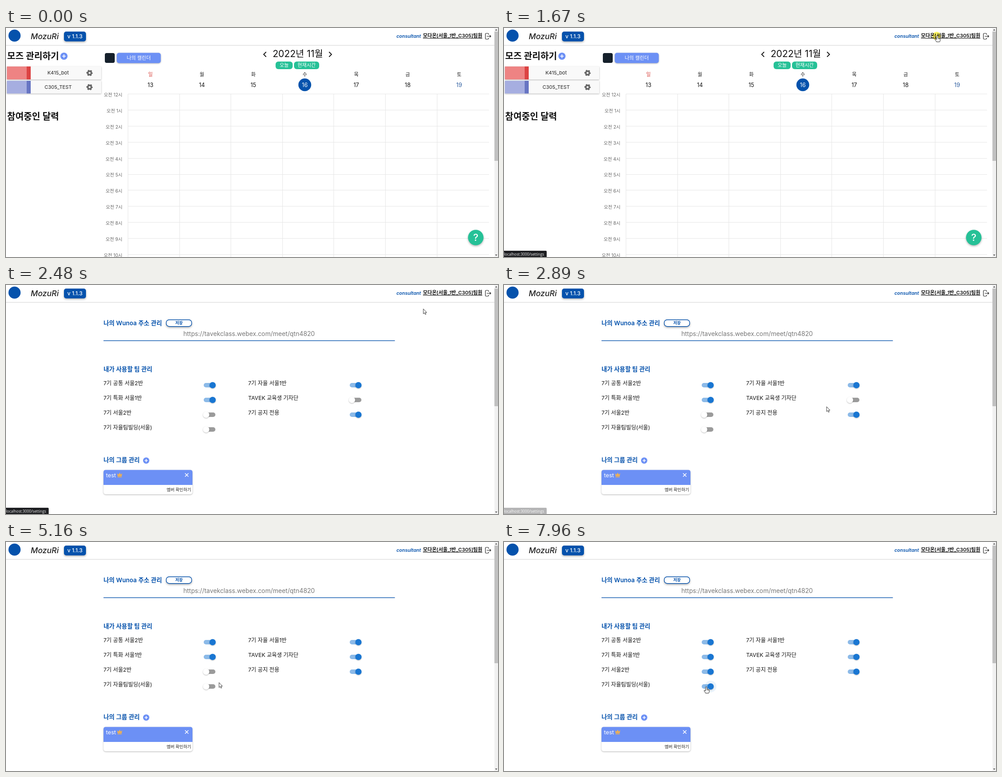
Animation of 1095x512 px, one loop 8 s. Source, as an HTML page:

```html
<!DOCTYPE html>
<html lang="ko">
<head>
<meta charset="utf-8">
<title>Calendar settings</title>
<style>
  html, body { margin: 0; width: 100%; height: 100%; overflow: hidden; background: #fff; }
  svg { display: block; width: 100vw; height: 100vh; }
  text { font-family: Inter, "Noto Sans CJK KR", "Noto Sans CJK", sans-serif; white-space: pre; }
  .lift { filter: drop-shadow(0 1px 1.5px rgba(0, 0, 0, .3)); }
  .float { filter: drop-shadow(0 2px 2px rgba(0, 0, 0, .3)); }
  .knob { filter: drop-shadow(0 1px .8px rgba(0, 0, 0, .28)); }
  .mark { mix-blend-mode: multiply; }
</style>
</head>
<body>
<svg id="stage" viewBox="0 0 1095 512"></svg>
<script>
const LOOP = 8000, TICK = 67;
const BLUE = '#0552ac', SOFT = '#6c90f5', GREEN = '#26c197', INK = '#111';

// --- drawing helpers (text is placed by its vertical centre) ---
const text = (x, cy, str, size, fill = INK, weight = 400, anchor = 'start', more = '') =>
  `<text x="${x}" y="${cy + size * .36}" font-size="${size}" fill="${fill}" font-weight="${weight}" text-anchor="${anchor}" ${more}>${str}</text>`;
const mid = (x, cy, str, size, fill, weight, more) => text(x, cy, str, size, fill, weight, 'middle', more);
const rect = (x, y, w, h, fill, rx = 0, more = '') =>
  `<rect x="${x}" y="${y}" width="${w}" height="${h}" fill="${fill}" rx="${rx}" ${more}/>`;
const circle = (x, y, r, fill, more = '') => `<circle cx="${x}" cy="${y}" r="${r}" fill="${fill}" ${more}/>`;
const line = (d, color, width = 1, more = '') =>
  `<path d="${d}" fill="none" stroke="${color}" stroke-width="${width}" ${more}/>`;
const group = (id, body, more = '') => `<g id="${id}" ${more}>${body}</g>`;
const range = n => [...Array(n).keys()];
const LIFT = 'class="lift"', FLOAT = 'class="float"';

const plus = (x, y, r) => circle(x, y, r, SOFT) +
  line(`M${x - r * .5} ${y}h${r}M${x} ${y - r * .5}v${r}`, '#fff', 1.7);
const gear = (x, y) => circle(x, y, 4, 'none', 'stroke="#666" stroke-width="3.4"') +
  circle(x, y, 6.1, 'none', 'stroke="#666" stroke-width="2" stroke-dasharray="3.4 2.99" stroke-dashoffset="1.7"');

// --- parts of the page ---
function header() {
  return rect(0, 0, 1087, 39, '#fff') + rect(0, 38, 1087, 1, '#dedede') + rect(0, 39, 1087, 1, '#f1f1f1') +
    circle(19, 17, 13.5, BLUE) +
    text(55, 19, 'MozuRi', 17.5, '#222', 500, 'start', 'font-style="italic"') +
    rect(129, 8, 49, 22, BLUE, 5, FLOAT) + mid(153.5, 18.5, 'v 1.1.3', 12.2, '#fff', 500) +
    text(869, 18, 'consultant', 10.5, BLUE, 600, 'start', 'font-style="italic"') +
    text(928, 17.5, '모다온[서울_1반_C305]팀원', 11, INK, 600, 'start', 'text-decoration="underline"') +
    line('M1074 15V13.5Q1074 12 1072.5 12H1068.5Q1067 12 1067 13.5V23.5Q1067 25 1068.5 25H1072.5Q1074 25 1074 23.5V22M1070 18.5H1079M1076.5 16L1079 18.5L1076.5 21', '#222', 1.2);
}

function scrollbar() {
  return rect(1087, 0, 8, 512, '#f1f1f1') + rect(1087, 8, 8, 289, '#c1c1c1', 0, 'id="thumb"') +
    '<path d="M1088.5 5.5l2.5-3l2.5 3zM1088.5 506.5l2.5 3l2.5-3z" fill="#505050"/>';
}

function teamCard(y, h, name, pale, strong) {
  const cy = y + h / 2;
  return rect(2, y, 210, h, '#f9f9f9', 1, LIFT) + rect(2, y, 44, h, pale) + rect(46, y, 9, h, strong) +
    mid(116, cy, name, 11, '#222') + gear(186, cy);
}

function calendar() {
  const colX = i => 271.5 + 114.6 * i, rowY = i => 147.5 + 35.9 * i;
  const days = [...'일월화수목금토'].map((day, i) => {
    const x = 321.5 + 114.5 * i, today = i === 3;
    const tint = today ? '#fff' : i === 6 ? '#2a5b9e' : INK;
    return mid(x, 104, day, 11, i ? '#222' : '#d8453f') +
      (today ? circle(x, 127, 14.3, BLUE) : '') + mid(x, 127, 13 + i, 12.5, tint);
  }).join('');
  const hours = range(11).map(i => text(259, 149.3 + 35.9 * i, `오전 ${i || 12}시`, 10.2, '#666', 400, 'end')).join('');
  const grid = range(7).map(i => `M${Math.floor(colX(i)) + .5} 147V512`).join('') +
    range(11).map(i => `M271 ${Math.floor(rowY(i)) + .5}H1075`).join('');
  return text(2.5, 63, '모즈 관리하기', 20, INK, 600) + plus(129, 63, 8) +
    teamCard(86, 29, 'K415_bot', '#ee8383', '#dc4343') +
    teamCard(118, 28.5, 'C305_TEST', '#a6aee0', '#6775c3') +
    text(2.5, 198, '참여중인 달력', 20, INK, 600) +
    rect(220, 56, 22, 22, '#15202b', 4) +
    rect(246.5, 55.5, 98, 23, SOFT, 5, LIFT) + mid(295.5, 67, '나의 캘린더', 11, '#fff', 500) +
    line('M579 53.5l-5.5 5.5l5.5 5.5M719 53.5l5.5 5.5l-5.5 5.5', INK, 1.8) +
    mid(649.5, 58, '2022년 11월', 20.8) +
    rect(600, 75, 38, 17, GREEN, 6) + mid(619, 83.5, '오늘', 11, '#fff', 500) +
    rect(641, 75, 56, 17, GREEN, 6) + mid(669, 83.5, '현재시간', 11, '#fff', 500) +
    line(grid, '#e6e6e6') + days + hours +
    circle(1045.5, 468.5, 17.3, GREEN, FLOAT) + mid(1045.5, 468.5, '?', 22, '#fff', 500);
}

function groupBox(y, headH, h) {
  const crossY = y + headH / 2 - 9.2;
  return text(217, y - 22, '나의 그룹 관리', 13.4, BLUE, 600) + plus(312, y - 21, 7) +
    rect(217, y, 198, h, '#fff', 5, LIFT) +
    `<path d="M217 ${y + headH}V${y + 5}q0-5 5-5h188q5 0 5 5V${y + headH}z" fill="${SOFT}"/>` +
    line(`M398.5 ${crossY}l7.5 7.5m0-7.5l-7.5 7.5`, '#fff', 1.6) +
    text(412, y + h - 10.7, '멤버 확인하기', 9.4, '#222', 400, 'end');
}

// label, column, row, then either a fixed state or the click tick and hover span
const teams = [
  { label: '7기 공통 서울2반', col: 0, row: 0, on: true },
  { label: '7기 자율 서울1반', col: 1, row: 0, on: true },
  { label: '7기 특화 서울1반', col: 0, row: 1, on: true },
  { label: 'TAVEK 교육생 기자단', col: 1, row: 1, click: 63, hover: [48, 69] },
  { label: '7기 서울2반', col: 0, row: 2, click: 89, hover: [81, 95] },
  { label: '7기 공지 전용', col: 1, row: 2, on: true },
  { label: '7기 자율팀빌딩(서울)', col: 0, row: 3, click: 113, hover: [94, 120] },
];

function teamRow({ label, col, row }, i) {
  const left = col ? 765 : 440, y = 224 + 33 * row;
  return text(col ? 539 : 217, 219.3 + 33 * row, label, 12.1) +
    rect(left, y - 5, 26, 10, '#9b9b9b', 5, `id="track${i}"`) +
    group('knob' + i, circle(0, 0, 13, '#000', `id="halo${i}"`) +
      circle(0, 0, 7, '#fff', 'class="knob"') + circle(0, 0, 7.1, '#1976d2', `id="disc${i}"`));
}

function settings() {
  const link = 'https://tavekclass.webex.com/meet/qtn4820';
  return text(217, 85, '나의 Wunoa 주소 관리', 13.4, BLUE, 600) +
    rect(356.7, 77.7, 56.5, 15, '#fff', 6.5, `stroke="${BLUE}" stroke-width="1.4" ${FLOAT}`) +
    mid(385, 85, '저장', 9, BLUE, 600) +
    rect(217, 123.8, 648.5, 1.4, BLUE) +
    text(217, 188, '내가 사용할 팀 관리', 13.4, BLUE, 600) +
    group('empty', mid(541, 109.5, 'Wunoa Link', 13.8, '#777') + groupBox(281, 29, 50)) +
    group('filled', mid(541, 109.5, link, 13.8, '#777') + teams.map(teamRow).join('') +
      groupBox(413.5, 33.5, 54.5) + text(222.5, 425.5, 'test', 12.7, '#fff') +
      '<path d="M247.5 421l3 3l2.5-4.5l2.5 4.5l3-3l-1 6.5h-9zM248.5 428.5h9v1.5h-9z" fill="#f2b04e"/>');
}

const pointers =
  group('hand', '<path d="M-1.5 1.5Q-1.5 0 0 0Q1.5 0 1.5 1.5V5Q3 4.3 3.5 5.5Q5 5 5.3 6.2Q6.8 6 6.8 7.5V10.5Q6.8 12 5.5 14H-1.5Q-2.5 11.5-4.5 9Q-5 7.5-3.5 7.3L-1.5 9z" fill="#fff" stroke="#222" stroke-width="1"/>' +
    line('M1.5 5v3M3.5 5.5v2.5M5.3 6.2v2', '#222', .7)) +
  '<path id="arrow" d="M0 0V11L2.5 8.7L4.2 12.5L6 11.7L4.3 8H7.5z" fill="#fff" stroke="#222" stroke-width=".9"/>';

const stage = document.getElementById('stage');
stage.innerHTML = rect(0, 0, 1095, 512, '#fff') + group('calendar', calendar()) + group('settings', settings()) +
  header() + scrollbar() +
  group('status', '<path d="M0 498H93q2 0 2 2V512H0z" fill="#1e1f22"/>' +
    text(0, 506, 'localhost:3000/settings', 8.3, '#f4f4f4', 400, 'start', 'style="font-family:\'Open Sans\',sans-serif"')) +
  circle(0, 0, 9.5, '#fff23a', 'id="spot" class="mark"') + group('cursor', pointers);

// --- motion, counted in ticks ---
const path = [
  [3, 1090, 60], [6, 1040, 40], [11, 961, 19], [13, 961, 19], [16, 964, 17], [36, 964, 17],
  [43, 718, 272], [47, 789, 266], [49, 780, 256], [66, 780, 256], [72, 545, 330], [75, 481, 322],
  [82, 457, 295], [91, 457, 295], [94, 458, 311], [101, 447, 329], [103, 447, 329], [105, 450, 324],
];
const statusFade = [[13, 0], [16, 1], [40, 1], [44, .1], [45, 0]];
const clicks = [25, 63, 89, 113];
const handSpans = [[10, 37], [49, 67], [81, 121]];

const clamp = v => Math.min(1, Math.max(0, v));
const within = (n, [from, to]) => n >= from && n < to;
function along(keys, n) {
  const next = keys.findIndex(k => k[0] > n);
  if (next === 0) return keys[0].slice(1);
  if (next < 0) return keys[keys.length - 1].slice(1);
  const a = keys[next - 1], b = keys[next], p = (n - a[0]) / (b[0] - a[0]);
  return a.slice(1).map((v, i) => v + (b[i + 1] - v) * p);
}

const el = id => document.getElementById(id);
const set = (id, name, value) => el(id).setAttribute(name, value);
const show = (id, on) => { el(id).style.display = on ? '' : 'none'; };
const fade = (id, value) => set(id, 'opacity', value);

function drawTeam({ col, row, on, click, hover }, i, n) {
  const p = on ? 1 : click ? clamp((n - click - 1) / 3) : 0;
  const x = (col ? 770 : 445.5) + 14.3 * p;
  set('knob' + i, 'transform', `translate(${x} ${224 + 33 * row})`);
  set('track' + i, 'fill', p > .4 ? '#8cbae8' : '#9b9b9b');
  fade('disc' + i, p);
  set('halo' + i, 'fill', p > .4 ? '#1976d2' : '#000');
  fade('halo' + i, hover && within(n, hover) ? (p > .4 ? .09 : .05) : 0);
}

function draw(n) {
  const [x, y] = along(path, n);
  const opened = n >= 28, loaded = n >= 29;
  show('calendar', !opened);
  show('settings', opened);
  show('empty', !loaded);
  show('filled', loaded);
  set('thumb', 'height', loaded ? 263 : 289);
  set('thumb', 'fill', n === 3 ? '#a8a8a8' : '#c1c1c1');
  teams.forEach((team, i) => drawTeam(team, i, n));
  fade('status', along(statusFade, n)[0]);

  const hand = handSpans.some(span => within(n, span));
  set('cursor', 'transform', `translate(${x} ${y})`);
  show('cursor', n >= 3);
  show('hand', hand);
  show('arrow', !hand);

  const age = n - (clicks.filter(c => c <= n).pop() ?? -9);
  set('spot', 'transform', `translate(${x - 1} ${y + 1})`);
  fade('spot', age < 3 ? .8 - age * .25 : 0);
}

let shown = -1;
function play(now) {
  const n = Math.floor((now % LOOP) / TICK + .1);
  if (n !== shown) draw(shown = n);
  requestAnimationFrame(play);
}
draw(0);
requestAnimationFrame(play);
</script>
</body>
</html>
```
